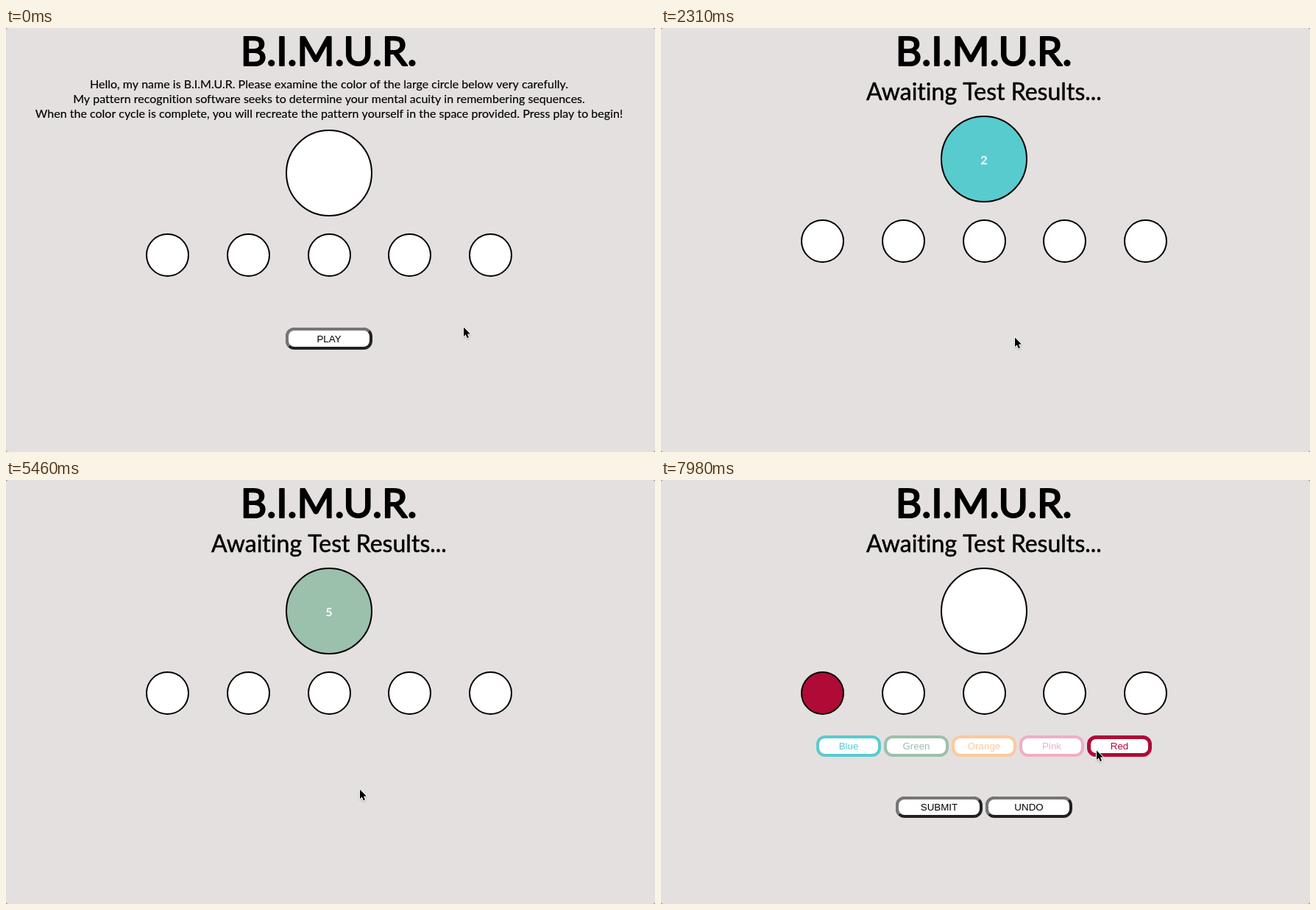
An HTML page with a canvas for the animation above (8000 ms loop, 882 px wide and 576 px high).

```html
<!DOCTYPE html>
<html lang="en">
<head>
<meta charset="utf-8">
<title>Memory test</title>
<style>
html, body { margin: 0; width: 100%; height: 100%; overflow: hidden; background: #e4e0df; }
canvas { display: block; }
</style>
</head>
<body>
<canvas id="stage" width="882" height="576"></canvas>
<script>
const ctx = document.getElementById('stage').getContext('2d');
const LOOP = 8000, STEP = 70, BEAT = 1050;
const NAME = 'B.I.M.U.R.';
const BLUE = '#58cbcf', GREEN = '#9bc0ab', ORANGE = '#fcc99c', PINK = '#efaec5', RED = '#b00a37';
const PATTERN = [RED, BLUE, RED, PINK, GREEN];
const CHOICES = [['Blue', BLUE], ['Green', GREEN], ['Orange', ORANGE], ['Pink', PINK], ['Red', RED]];
const INTRO = [
  `Hello, my name is ${NAME} Please examine the color of the large circle below very carefully.`,
  'My pattern recognition software seeks to determine your mental acuity in remembering sequences.',
  'When the color cycle is complete, you will recreate the pattern yourself in the space provided. Press play to begin!'
];
const HAND = 'Lato, "Open Sans", sans-serif';
const UI = '"Liberation Sans", Arial, sans-serif';

// Cursor path: time, x, y
const PATH = [
  [280, 622, 406], [1050, 481, 420], [7000, 481, 420],
  [7700, 595, 367], [7840, 595, 367], [7980, 592, 367]
];

function cursorAt(t) {
  if (t <= PATH[0][0]) return PATH[0].slice(1);
  for (let i = 1; i < PATH.length; i++) {
    const [t0, x0, y0] = PATH[i - 1], [t1, x1, y1] = PATH[i];
    if (t < t1) {
      const u = (t - t0) / (t1 - t0), k = u * u * (3 - 2 * u);
      return [x0 + (x1 - x0) * k, y0 + (y1 - y0) * k];
    }
  }
  return PATH[PATH.length - 1].slice(1);
}

function label(str, x, y, size, family, color, weight = 0) {
  ctx.font = `${size}px ${family}`;
  ctx.letterSpacing = '0.01px'; // turns ligatures off
  ctx.textAlign = 'center';
  ctx.textBaseline = 'alphabetic';
  ctx.fillStyle = ctx.strokeStyle = color;
  ctx.fillText(str, x, y);
  if (weight) {
    ctx.lineWidth = weight;
    ctx.lineJoin = 'round';
    ctx.strokeText(str, x, y);
  }
}

function disc(x, y, r, fill) {
  ctx.beginPath();
  ctx.arc(x, y, r, 0, 7);
  ctx.fillStyle = fill;
  ctx.fill();
  ctx.lineWidth = 2;
  ctx.strokeStyle = '#000';
  ctx.stroke();
}

function box(x, y, w, h, r, fill) {
  ctx.beginPath();
  ctx.roundRect(x, y, w, h, r);
  ctx.fillStyle = fill;
  ctx.fill();
}

function inside(x, y, w, h, [px, py]) {
  return px >= x && px < x + w && py >= y && py < y + h;
}

function button(str, x, y, w, h, mouse, lit, dark, ink) {
  const b = inside(x, y, w, h, mouse) ? 5 : 4, m = h / 2;
  box(x, y, w, h, 12, dark);
  if (lit !== dark) {
    // Bevel: the top and left sides take the other shade
    ctx.save();
    ctx.beginPath();
    ctx.moveTo(x, y + h);
    ctx.lineTo(x, y);
    ctx.lineTo(x + w, y);
    ctx.lineTo(x + w - m, y + m);
    ctx.lineTo(x + m, y + m);
    ctx.clip();
    box(x, y, w, h, 12, lit);
    ctx.restore();
  }
  box(x + b, y + b, w - 2 * b, h - 2 * b, 12 - b, '#fff');
  label(str, x + w / 2, y + h / 2 + 4.7, 13.33, UI, ink);
}

const GREY = '#767676', DARK = '#212121';
function plain(str, x, y, h, mouse, pressed) {
  button(str, x, y, 118, h, mouse, pressed ? DARK : GREY, pressed ? GREY : DARK, '#000');
}

function ring(x, y) {
  ctx.beginPath();
  ctx.arc(x, y, 19.5, 0, 7);
  ctx.lineWidth = 5.5;
  ctx.strokeStyle = '#fff';
  ctx.stroke();
  ctx.lineWidth = 3;
  ctx.strokeStyle = '#000';
  ctx.stroke();
}

function pointer(x, y) {
  ctx.save();
  ctx.translate(x, y);
  ctx.beginPath();
  [[0, 0.5], [0, 13], [2.8, 10.5], [4.8, 15.2], [7, 14.3], [5, 9.7], [8.8, 9.6]]
    .forEach(p => ctx.lineTo(...p));
  ctx.closePath();
  ctx.shadowColor = 'rgba(0,0,0,.25)';
  ctx.shadowBlur = 2;
  ctx.shadowOffsetY = 1;
  ctx.lineWidth = 2;
  ctx.lineJoin = 'round';
  ctx.strokeStyle = '#fff';
  ctx.stroke();
  ctx.shadowColor = 'transparent';
  ctx.fillStyle = '#000';
  ctx.fill();
  ctx.restore();
}

function draw(now) {
  const t = Math.floor(now % LOOP / STEP) * STEP;
  const mouse = cursorAt(t);
  const intro = t < 1260, answering = t >= 6510;
  const beat = intro || answering ? -1 : Math.floor((t - 1260) / BEAT);
  const shift = intro ? 19 : 0;

  ctx.fillStyle = '#777';
  ctx.fillRect(0, 0, 882, 576);
  box(0, 0, 882, 576, 3, '#e4e0df');
  label(NAME, 438.5, 50.7, 55, HAND, '#000', 2.2);

  if (intro) INTRO.forEach((s, i) => label(s, 439, 82 + 20 * i, 16, HAND, '#000', 0.15));
  else label('Awaiting Test Results...', 439, 98, 32, HAND, '#000', 0.5);

  disc(439, 178 + shift, 58, beat < 0 ? '#fff' : PATTERN[beat]);
  if (beat >= 0) label(beat + 1, 439, 185, 16, HAND, '#fff', 0.4);
  for (let i = 0; i < 5; i++) {
    const left = Math.round(190 + 109.75 * i);
    disc(left + 29.5, 289.5 + shift, 28.5, i === 0 && t >= 7980 ? RED : '#fff');
  }

  if (intro) plain('PLAY', 380, 407, 30, mouse, t >= 1190);
  if (answering) {
    CHOICES.forEach(([s, c], i) => button(s, 211 + 92 * i, 347, 88, 29, mouse, c, c, c));
    plain('SUBMIT', 319, 430, 29, mouse);
    plain('UNDO', 441, 430, 29, mouse);
  }

  if ((t >= 1120 && t < 1260) || (t >= 7840 && t < 7980)) ring(mouse[0], mouse[1] + 1);
  pointer(...mouse);
}

const start = performance.now();
function tick() {
  draw(performance.now() - start);
  requestAnimationFrame(tick);
}
tick();
</script>
</body>
</html>
```
